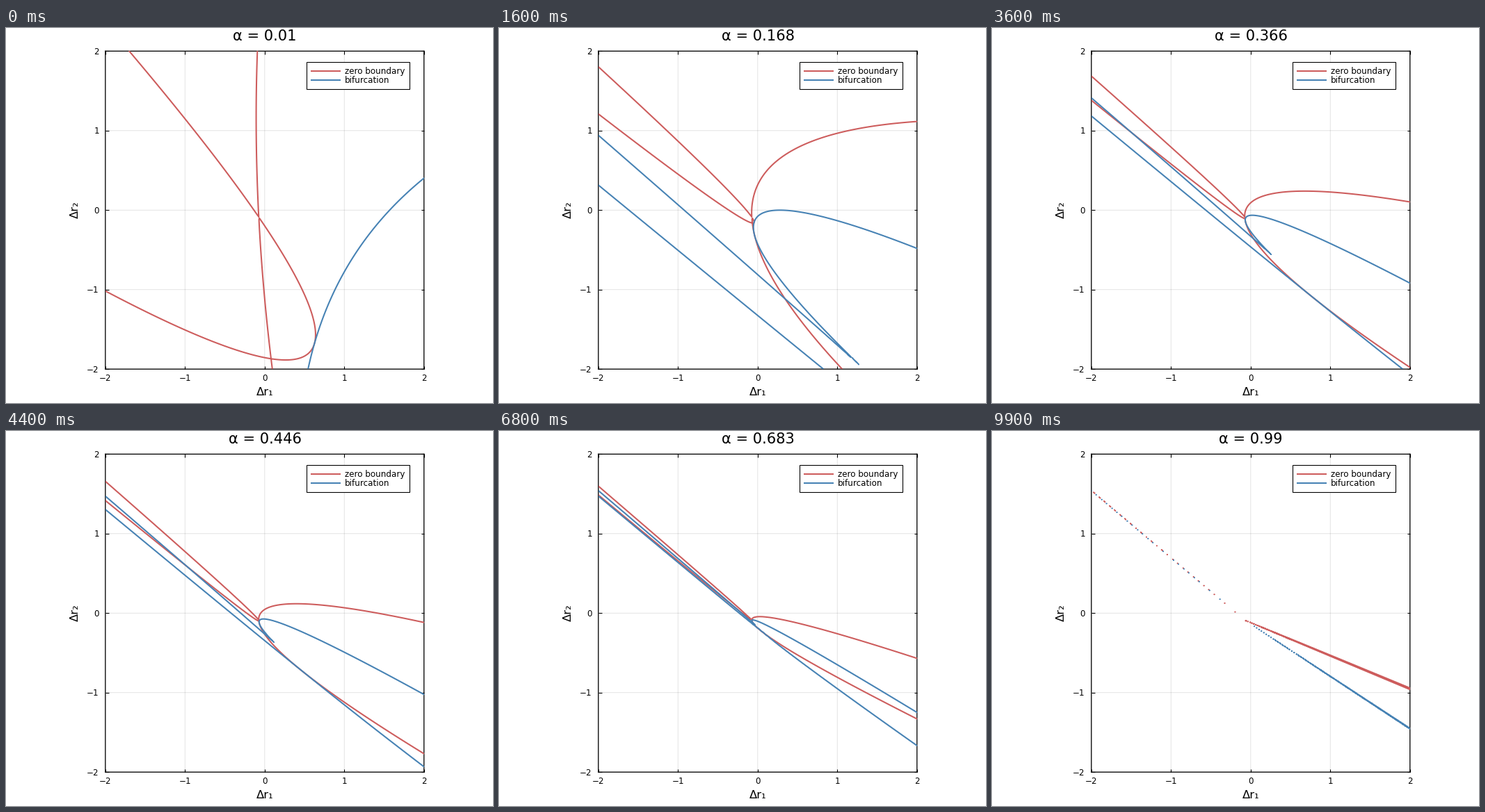
A matplotlib script for the animation above (10 s loop, 700x540 px).

```python
import matplotlib.pyplot as plt
import numpy as np
from matplotlib.animation import FuncAnimation
from matplotlib.collections import LineCollection
from matplotlib.patches import Rectangle

W, H, DPI = 700, 540, 100
FRAMES = 100
LEFT, RIGHT, TOP, BOTTOM = 142.8, 600.8, 33.3, 491.2
RED, BLUE = "indianred", "steelblue"
PX = 72 / DPI
LW = 2.05 * PX

plt.rcParams["font.family"] = "DejaVu Sans"

# Two-species equilibrium with linear and quadratic interactions:
# each species alone traces a parabola through the extinction point.
CX, CY = -0.074, -0.088
M1, U1, P1 = 0.847, -1.628, -91.1
M2, U2, P2 = 0.4164, -0.053, 2.1
MIX_X, MIX_Y = -27.17, 23.79

# Pencil of the two equilibrium conics, as polynomials in its parameter.
A = np.poly1d([P1, -M1 * P1])
B = np.poly1d([P2, -M2 * P2])
C = np.poly1d([MIX_X / 2, MIX_Y / 2])
G = np.poly1d([U1 / 2, (1 - M1 * U1) / 2])
F = np.poly1d([U2 / 2, (1 - M2 * U2) / 2])
D2, D1, D0 = (A * B - C * C).coeffs
E3, E2, E1, E0 = (A * F * F - 2 * C * G * F + B * G * G).coeffs

axis = np.linspace(-2, 2, 400)
gx, gy = np.meshgrid(axis, axis)


def zero_boundary(x, y):
    w1, w2 = y + M1 * x, y + M2 * x
    return (x - U1 * w1 - P1 * w1**2) * (x - U2 * w2 - P2 * w2**2)


def bifurcation(x, y):
    """Cubic discriminant: zero where the two conics touch."""
    a = -x * D2 - E3
    b = -x * D1 - y * D2 - E2
    c = -x * D0 - y * D1 - E1
    d = -y * D0 - E0
    return (18 * a * b * c * d - 4 * b**3 * d + b * b * c * c
            - 4 * a * c**3 - 27 * a * a * d * d)


fig = plt.figure(figsize=(W / DPI, H / DPI), dpi=DPI, facecolor="white")
ax = fig.add_axes([LEFT / W, 1 - BOTTOM / H,
                   (RIGHT - LEFT) / W, (BOTTOM - TOP) / H])
ax.set(xlim=(-2, 2), ylim=(-2, 2), xticks=range(-2, 3), yticks=range(-2, 3))
ax.set_axisbelow(True)
ax.grid(color="black", alpha=0.12, lw=0.9 * PX, snap=False)
ax.tick_params(direction="in", length=4.5 * PX, width=1.1 * PX, top=True,
               right=True, labelbottom=False, labelleft=False)
for spine in ax.spines.values():
    spine.set_linewidth(1.3 * PX)
    spine.set_snap(False)

# Overlay in pixel coordinates for the text and the legend.
page = fig.add_axes([0, 0, 1, 1])
page.set(xlim=(0, W), ylim=(H, 0))
page.axis("off")


def label(x, y, text, size, ha="center", **kw):
    return page.text(x, y, text, fontsize=size * PX, ha=ha, va="baseline", **kw)


for v in range(-2, 3):
    name = str(v).replace("-", "\u2212")
    step = (RIGHT - LEFT) / 4
    label(LEFT + (v + 2) * step, 507.6, name, 11.9)
    label(133.8, BOTTOM - (v + 2) * step + 4.4, name, 11.9, ha="right")

label(372, 528.8, "Δr₁", 16.4)
label(103.8, 262, "Δr₂", 16.4, rotation=90, rotation_mode="anchor")
title = label(372, 18, "", 21)

page.add_patch(Rectangle((431.8, 48.5), 148, 39, fc="white", ec="black",
                         lw=1.1 * PX))
for y, color, name in ((61.5, RED, "zero boundary"), (74.5, BLUE, "bifurcation")):
    page.plot([438, 481], [y, y], color=color, lw=LW, solid_capstyle="butt")
    label(487, y + 4.4, name, 11.9, ha="left")


def curve(color):
    lines = LineCollection([], colors=color, linewidths=LW, capstyle="round",
                           joinstyle="round", zorder=2.6)
    return ax.add_collection(lines, autolim=False)


curves = [(zero_boundary, curve(RED)), (bifurcation, curve(BLUE))]


def zero_lines(z):
    cs = ax.contour(gx, gy, z, [0])
    cs.remove()
    return cs.allsegs[0]


def update(i):
    alpha = 0.01 + 0.98 * i / (FRAMES - 1)
    scale = (1 - alpha) ** 2 / alpha
    x, y = (gx - CX) / scale, (gy - CY) / scale
    # Open polylines keep single-cell loops visible as dots.
    for f, lines in curves:
        lines.set_segments(zero_lines(f(x, y)))
    title.set_text(f"α = {round(alpha, 3)}")
    return [title]


anim = FuncAnimation(fig, update, frames=FRAMES, interval=100,
                     init_func=lambda: [title], repeat=True, repeat_delay=0)
plt.show()
```
